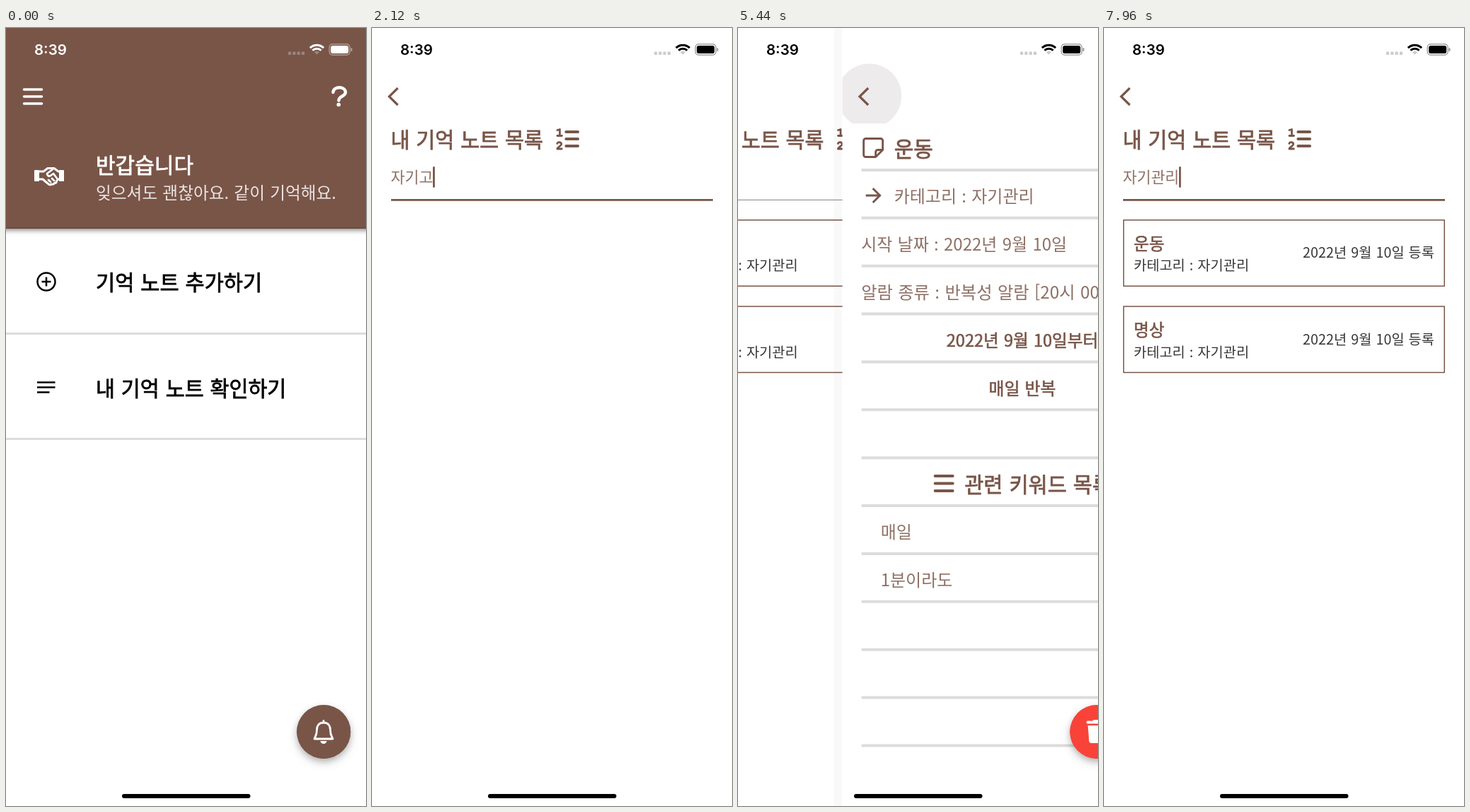
Animation, 509 px wide and 1101 px high, one loop 8 s. Source, as an HTML page with a canvas:

```html
<!DOCTYPE html>
<html lang="ko">
<head>
<meta charset="utf-8">
<style>
html, body { margin: 0; width: 100%; height: 100%; overflow: hidden; background: #fff; }
canvas { display: block; }
</style>
</head>
<body>
<canvas id="stage" width="509" height="1101"></canvas>
<script>
const W = 509, H = 1101, LOOP = 8000, STEP = 40;
const BROWN = '#795548', RED = '#f94339', RULE = '#dcdcdc', INK = '#111';
const ctx = document.getElementById('stage').getContext('2d');

const clamp = v => Math.max(0, Math.min(1, v));
const easeOut = u => 1 - (1 - clamp(u)) ** 3;

// Page curve: cubic-bezier(.35, .91, .33, .97)
function pageEase(p) {
  if (p <= 0) return 0;
  if (p >= 1) return 1;
  const bez = (a, b, s) => 3 * a * s * (1 - s) ** 2 + 3 * b * s * s * (1 - s) + s ** 3;
  let lo = 0, hi = 1;
  for (let i = 0; i < 24; i++) {
    const mid = (lo + hi) / 2;
    if (bez(.35, .33, mid) < p) lo = mid; else hi = mid;
  }
  return bez(.91, .97, lo);
}

// ---- drawing helpers ----
function text(str, x, cy, size, color, style = 'light', align = 'left') {
  const light = style === 'light';
  ctx.save();
  ctx.font = `${light ? 300 : 400} ${size}px ${light ? '"Noto Sans CJK KR Light", ' : ''}"Noto Sans CJK KR", "Noto Sans CJK", sans-serif`;
  ctx.wordSpacing = size * .08 + 'px';
  ctx.textAlign = align;
  ctx.globalAlpha = light ? .84 : 1; // softens the thin weight
  const y = cy + size * .37;
  ctx.fillStyle = color;
  ctx.fillText(str, x, y);
  if (!light) {
    ctx.strokeStyle = color;
    ctx.lineWidth = size * .026;
    ctx.strokeText(str, x, y);
  }
  const width = ctx.measureText(str).width;
  ctx.restore();
  return width;
}

function stroke(d, color, width, cap = 'round') {
  ctx.strokeStyle = color;
  ctx.lineWidth = width;
  ctx.lineCap = cap;
  ctx.lineJoin = cap === 'round' ? 'round' : 'miter';
  ctx.stroke(new Path2D(d));
}

function fill(d, color) {
  ctx.fillStyle = color;
  ctx.fill(new Path2D(d));
}

function rect(x, y, w, h, color, r = 0) {
  ctx.fillStyle = color;
  ctx.beginPath();
  ctx.roundRect(x, y, w, h, r);
  ctx.fill();
}

function disc(x, y, r, color) {
  ctx.fillStyle = color;
  ctx.beginPath();
  ctx.arc(x, y, r, 0, Math.PI * 2);
  ctx.fill();
}

function withShadow(color, blur, dy, draw) {
  ctx.save();
  ctx.shadowColor = color;
  ctx.shadowBlur = blur;
  ctx.shadowOffsetY = dy;
  draw();
  ctx.restore();
}

function fab(x, color) {
  withShadow('rgba(0,0,0,.12)', 16, 6, () => disc(x, 996, 38, color));
  withShadow('rgba(0,0,0,.22)', 8, 4, () => disc(x, 996, 38, color));
}

const chevron = () => stroke('M36.5 85L24.3 97l12.2 12', BROWN, 3.2, 'butt');

// ---- pages ----
function homePage() {
  rect(0, 0, W, H, '#fff');
  withShadow('rgba(0,0,0,.5)', 7, 2, () => rect(-10, -10, W + 20, 294, BROWN));
  rect(0, 282, W, 2, 'rgba(0,0,0,.1)');
  stroke('M25.5 87h25M25.5 97h25M25.5 107h25', '#fff', 3.6);
  stroke('M462.5 91C463 82 480 82 480 91C480 97 470.5 96 470.5 102.5', '#fff', 4.4);
  disc(470.3, 108.5, 2.8, '#fff');

  rect(40, 201, 7, 16, '#fff', 1);
  rect(75, 201, 7, 16, '#fff', 1);
  stroke('M47 203h6l6-4.5h9l6 4.5h2M47 214h5l7 6q3 3 5 1q3 1 4.5-1.5q3 0 3-3l2.5-2.5h2', '#fff', 3);
  stroke('M66 200l-8 6q1 5 5 3l4-3l6 8M60 215l3 3M65 213l3 3', '#fff', 2.8);
  text('반갑습니다', 127, 193.5, 30, '#fff', 'strong');
  text('잊으셔도 괜찮아요. 같이 기억해요.', 127, 233, 23.7, '#fff');

  stroke('M44.5 359a12.5 12.5 0 1 0 25 0a12.5 12.5 0 1 0-25 0M50.5 359h13M57 352.5v13', '#000', 2.5, 'butt');
  text('기억 노트 추가하기', 127, 360, 29.5, '#000', 'strong');
  rect(0, 431, W, 3, RULE);
  stroke('M44 501.5h25.5M44 508.5h25.5M44 515.5h17.5', '#000', 2.6, 'butt');
  text('내 기억 노트 확인하기', 127, 510, 29.3, '#000', 'strong');
  rect(0, 580, W, 3, RULE);

  fab(449.2, BROWN);
  stroke('M449 983C442 983 439.5 988 439.5 993C439.5 1001 437.5 1002 436 1006H462C460.5 1002 458.5 1001 458.5 993C458.5 988 456 983 449 983ZM449 980.5v2', '#fff', 2.8);
  fill('M444.5 1009h9a4.5 4 0 0 1-9 0z', '#fff');
}

const notes = [['운동', '자기관리'], ['객체지향설계', '대학교'], ['명상', '자기관리']];

const typing = [
  [1760, 'ㅈ'], [1800, '자'], [1840, '작'], [2000, '자기'], [2040, '자기ㄱ'],
  [2120, '자기고'], [2160, '자기과'], [2200, '자기관'], [2240, '자기관ㄹ'], [2280, '자기관리']
];

function queryAt(t) {
  let query = '';
  for (const [at, value] of typing) if (t >= at) query = value;
  return query;
}

function cursorAlpha(t) {
  if (t < 1520 || (t >= 3320 && t < 5840)) return 0;
  if (t < 3320) return 1 - easeOut((t - 2820) / 340);
  if (t < 6345) return 1;
  const blink = Math.floor((t - 6345) / 480);
  const e = easeOut((t - 6345) % 480 / 230);
  return blink % 2 ? e : 1 - e;
}

function focusAmount(t) {
  if (t >= 5840) return clamp((t - 5800) / 160);
  return t >= 1520 && t < 3320 ? clamp((t - 1480) / 80) : 0;
}

function listPage(t) {
  rect(0, 0, W, H, '#fff');
  chevron();
  text('내 기억 노트 목록', 26.5, 158, 29.3, BROWN, 'strong');
  stroke('M274.5 147h16.5M274.5 157h16.5M274.5 167h16.5', BROWN, 4.2);
  stroke('M262 144.5l3.5-1v9M262 152.5h6.5M261.8 163.5c1-3 6-2 6 1c0 2-5 3.500-6 6.500h6.500', BROWN, 2.8);

  const query = queryAt(t);
  const width = text(query || '카테고리로 검색', 26.5, 210.5, 21.7, BROWN);
  ctx.globalAlpha = cursorAlpha(t);
  rect(query ? 26.2 + width : 27, 196, 2.8, 30, BROWN, 1.4);
  ctx.globalAlpha = 1;

  const focus = focusAmount(t), line = 1.4 + 1.4 * focus;
  rect(27, 243.4 - line / 2, 455, line, focus ? BROWN : '#999');

  notes.filter(([, category]) => category.includes(query)).forEach(([title, category], i) => {
    const y = 271 + i * 122.2;
    ctx.strokeStyle = BROWN;
    ctx.lineWidth = 1.5;
    ctx.strokeRect(27.7, y + .7, 453.6, 93.6);
    text(title, 42, y + 34, 23.6, BROWN, 'strong');
    text('카테고리 : ' + category, 42, y + 65, 19.8, INK);
    text('2022년 9월 10일 등록', 467, y + 47, 19.8, INK, 'light', 'right');
  });
}

function detailPage(ripple) {
  rect(0, 0, W, H, '#fff');
  if (ripple) {
    ctx.save();
    ctx.beginPath();
    ctx.rect(0, 0, W, 135);
    ctx.clip();
    disc(38, 96, 45.5, '#edebec');
    ctx.restore();
  }
  chevron();
  for (let i = 0; i < 13; i++) rect(27, 199 + i * 67.87, 455, 4, RULE);

  stroke('M33 156.5h21a3 3 0 0 1 3 3v13l-10 10h-14a3 3 0 0 1-3-3v-20a3 3 0 0 1 3-3zM56.5 172.5h-6.5a3 3 0 0 0-3 3v6.5', BROWN, 2.9);
  text('운동', 73, 171, 30, BROWN, 'strong');
  stroke('M33 237h20M43 227l10 10l-10 10', BROWN, 2.9, 'butt');
  text('카테고리 : 자기관리', 73, 238, 24, BROWN);
  text('시작 날짜 : 2022년 9월 10일', 26.5, 306, 24, BROWN);
  text('알람 종류 : 반복성 알람 [20시 00분]', 26.5, 374, 24.3, BROWN);
  text('2022년 9월 10일부터', 254.3, 442, 23.6, BROWN, 'strong', 'center');
  text('매일 반복', 254.3, 510, 23.8, BROWN, 'strong', 'center');
  stroke('M131 634h25M131 644.5h25M131 655h25', BROWN, 4);
  text('관련 키워드 목록', 172.5, 646, 29.5, BROWN, 'strong');
  text('매일', 54, 713, 24, BROWN);
  text('1분이라도', 54, 781, 24, BROWN);

  fab(359.7, RED);
  rect(345, 980.5, 29.5, 4, '#fff', 1.5);
  rect(354, 979, 11.5, 4, '#fff', 1.5);
  fill('M347 987h25.5l-1.7 22q-.3 3-3 3h-16.100q-2.700 0-3-3z', '#fff');

  fab(449.2, BROWN);
  fill('M433 1012l2-10l17.5-17.5l8 8l-17.5 17.5z', '#fff');
  fill('M454.5 982.5l2-2q2.5-2 5 0l3 3q2.5 2.5 0 5l-2 2z', '#fff');
  stroke('M437 1005l3 3', BROWN, 1.4);
}

function statusBar(color) {
  ctx.fillStyle = color;
  ctx.font = '600 20.5px Inter, sans-serif';
  ctx.textAlign = 'left';
  ctx.fillText('8:39', 40, 38);
  const light = color === '#fff';
  for (let i = 0; i < 4; i++) rect(399 + i * 6.3, 33.5, 4.2, 4.5, light ? 'rgba(255,255,255,.28)' : '#ccc', 1);

  ctx.strokeStyle = color;
  ctx.lineWidth = 3;
  ctx.lineCap = 'butt';
  for (const r of [13.6, 8.6]) {
    ctx.beginPath();
    ctx.arc(439.5, 37.8, r, -Math.PI * .75, -Math.PI * .25);
    ctx.stroke();
  }
  ctx.beginPath();
  ctx.moveTo(439.5, 37.8);
  ctx.arc(439.5, 37.8, 5, -Math.PI * .75, -Math.PI * .25);
  ctx.fill();

  ctx.strokeStyle = light ? 'rgba(255,255,255,.5)' : '#8a8a8a';
  ctx.lineWidth = 1.2;
  ctx.beginPath();
  ctx.roundRect(457.2, 22.9, 29, 15.2, 4.5);
  ctx.stroke();
  rect(459.2, 24.9, 25, 11.2, color, 2.8);
  rect(487.6, 28.3, 1.8, 4.6, light ? 'rgba(255,255,255,.5)' : '#8a8a8a', 1);
}

// ---- navigation ----
function shifted(x, draw) {
  ctx.save();
  ctx.translate(x, 0);
  draw();
  ctx.restore();
}

// shown: 0 = only the lower page, 1 = only the upper page
function stack(lower, upper, shown) {
  if (shown < 1) shifted(-W / 3 * shown, lower);
  if (shown > 0) shifted(W * (1 - shown), () => {
    if (shown < 1) rect(-12, 0, 12, H, 'rgba(60,20,30,.025)');
    upper();
  });
}

function draw(t) {
  const list = () => listPage(t);
  const opened = pageEase((t - 720) / 240);
  if (t < 2000) {
    stack(homePage, list, opened);
  } else {
    const popped = pageEase((t - 5395.6) / 400);
    const shown = pageEase((t - 3280) / 240) * (1 - popped);
    stack(list, () => detailPage(popped > 0), shown);
  }
  statusBar(opened < .5 ? '#fff' : '#000');
  rect(164, 1084, 181.5, 6, '#000', 3);
}

const start = performance.now();
function tick() {
  const t = (performance.now() - start) % LOOP;
  draw(Math.floor(t / STEP) * STEP);
  requestAnimationFrame(tick);
}
tick();
</script>
</body>
</html>
```
